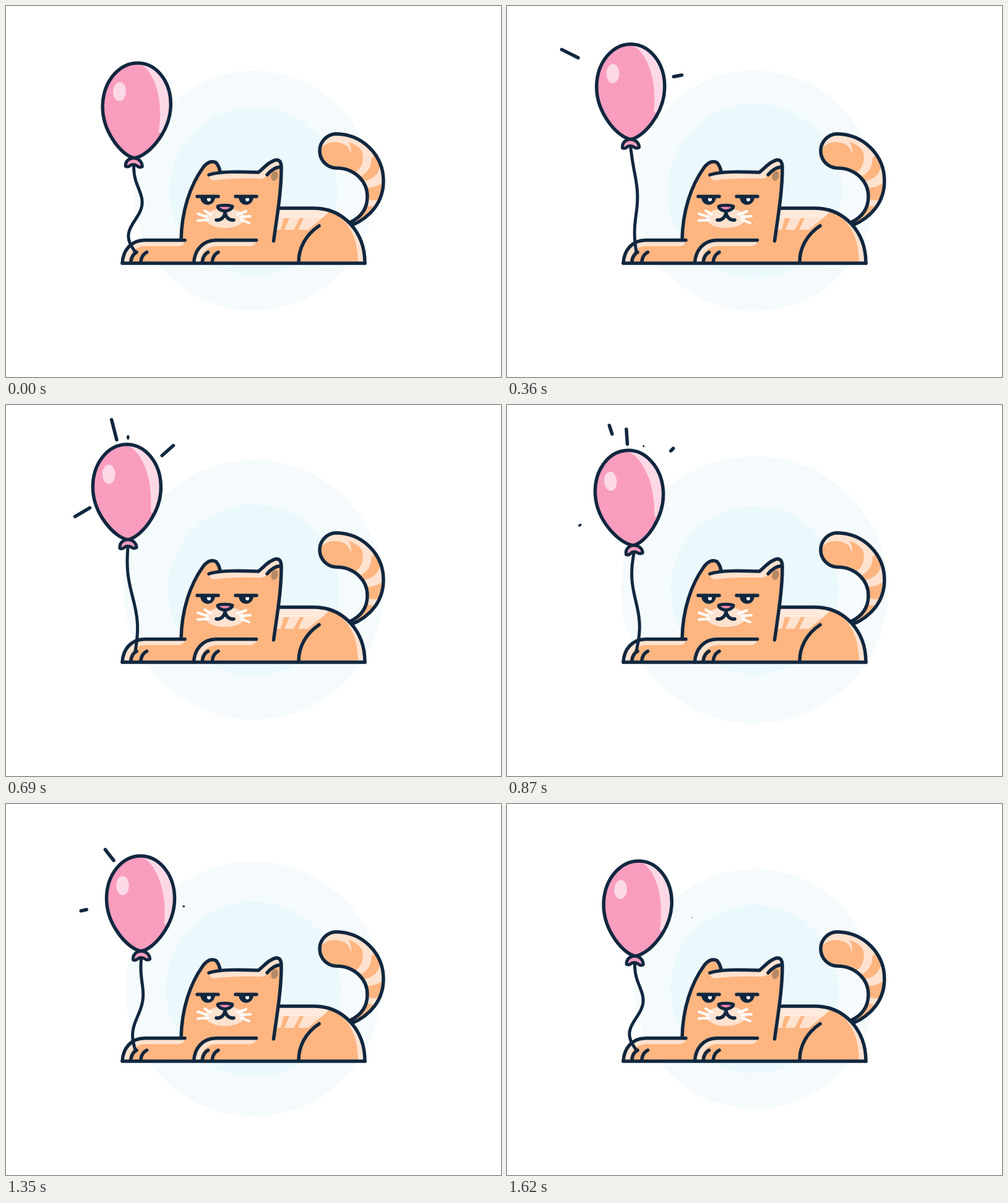
Write an HTML page that moves like this. It is 800 px wide and 600 px high and loops after 1.65 s.

```html
<!DOCTYPE html>
<html lang="en">
<head>
<meta charset="utf-8">
<title>Cat with balloon</title>
<style>
  html, body { margin: 0; width: 100%; height: 100%; overflow: hidden; background: #fff; }
  svg { display: block; width: 100vw; height: 100vh; }
  .ink { fill: none; stroke: #11273f; stroke-width: 5.5; stroke-linecap: round; stroke-linejoin: round; }
  .fur { fill: #ffb580; }
  .pale { fill: #ffe2cf; }
  .pink { fill: #f99dbf; }
  .dark { fill: #11273f; }
</style>
</head>
<body>
<svg viewBox="0 0 800 600">
  <defs>
    <path id="tail" d="M556 350C573 342 584 328 584 308C584 284 564 262 533 262A27.7 27.7 0 0 1 533 206.7C576 207 610 241 610 283C610 317 589 342 558 355Z"/>
    <path id="skin" d="M0 0C-21 -3 -56 -42 -56 -85C-56 -124 -31 -154 -1 -154C29 -154 54 -124 54 -85C54 -42 20 -3 0 0Z"/>
    <clipPath id="inTail"><use href="#tail"/></clipPath>
    <clipPath id="inSkin"><use href="#skin"/></clipPath>
    <g id="eye">
      <path class="dark" d="M-12 0C-12 8 -7 13.5 0 13.5C7 13.5 12 8 12 0Z"/>
      <path fill="#fff" d="M-1 2.5H5V5C5 9 -1 9 -1 5Z"/>
      <path class="ink" d="M-17 0H17"/>
    </g>
    <g id="arm">
      <path class="pale" d="M0 37C1 17 14 0 36 0H102C100 6 97 9.5 92 9.5H35C20 11 11 23 10 37Z"/>
      <path class="ink" d="M0 37C1 17 14 0 36 0H101M14 34C15 26 18 22 23 19.5M30 34C31 26 34 22 39.5 19.5"/>
    </g>
  </defs>

  <circle id="outer" cx="400" cy="298.8" fill="#f5fbfd"/>
  <circle id="inner" cx="400" cy="299.3" fill="#ebf8fc"/>

  <use href="#tail" class="fur"/>
  <g clip-path="url(#inTail)" class="pale">
    <path d="M503 240C513 219 530 217 545 223C553 226 556 232 557 239C559 231 557 225 553 220C563 222 570 228 575 234L592 246L603 225L540 195L500 200Z"/>
    <path d="M574 232C580 246 576 262 565 269L574 275C587 268 592 256 590 243Z"/>
    <path d="M579 283C592 281 602 272 604 261L615 278C610 288 597 294 584 294Z"/>
    <path d="M582 311C592 316 602 315 612 308L606 323C596 326 586 324 578 320Z"/>
  </g>
  <use href="#tail" class="ink"/>

  <path class="fur" d="M430 327H497C545 327 580 365 580 416H430Z"/>
  <path class="pale" d="M436 327H497C545 327 580 365 580 416H569C569 372 552 341 521 333L511 343L488 362H472L481 343H475L465 362H450L458 343H449L444 362H436Z"/>
  <path fill="#ffeadc" d="M436 329H497C506 329 514 331 521 334L511 343H436Z"/>
  <path class="ink" d="M440 327H497C545 327 580 365 580 416M473 414C473 392 484 370 506 355.5"/>

  <path class="fur" d="M188 416C189 395 202 379 224 379H283C284 330 298 290 318 262C325 252 333 250 339 253C343 257 345 262 346 269H408C417 262 424 252 436 249C443 248 445 254 445 262C445 300 438 340 433 380V416Z"/>
  <path class="pale" d="M328 273C350 268 380 268 408 269L422 273C420 278 415 280 405 279C380 278 350 280 336 282C331 282 328 278 328 273Z"/>
  <path class="pale" d="M408 269C417 262 424 252 436 249C442 248 444 254 444 260C434 261 428 266 422 273Z"/>
  <ellipse cx="434" cy="275" rx="5.5" ry="8" transform="rotate(15 434 275)" fill="#b58a67"/>
  <path class="ink" d="M283 378C284 330 298 290 318 262C325 252 333 250 339 253C343 257 345 262 346 268M328 273C345 267 380 268 408 269C417 262 424 252 436 249C443 248 445 254 445 262C445 300 438 340 432.5 380M422 273C428 266 434 261 442 260.5"/>

  <ellipse class="pale" cx="354" cy="343" rx="32" ry="16"/>
  <path d="M321 331L331 337M310 336L325 341M310 347L327 346M388 332L374 337M395 340L379 341M393 351L380 346" stroke="#fff" stroke-width="4" stroke-linecap="round"/>
  <use href="#eye" x="326" y="308"/>
  <use href="#eye" x="388" y="308"/>
  <path class="ink" d="M340 346C347 347 353 342 354 334C355 342 361 347 368 346"/>
  <path class="ink" style="fill:#f986b0;stroke-width:5" d="M342 324C346 321.5 361 321.5 366 324C366 328 359 331.5 354 331.5C348 331.5 342 328 342 324Z"/>

  <use href="#arm" x="188" y="378.7"/>
  <use href="#arm" x="303.5" y="378.7"/>
  <path class="ink" d="M188 416H580"/>

  <path id="string" class="ink" style="stroke-width:5"/>
  <g id="balloon">
    <g id="dashes"></g>
    <use href="#skin" class="pink"/>
    <path clip-path="url(#inSkin)" fill="#fdd8e6" d="M0 -152C18 -147 43 -108 37 -44L65 -40V-160H0Z"/>
    <ellipse cx="-30" cy="-106" rx="10.3" ry="15.5" fill="#fdd8e6"/>
    <use href="#skin" class="ink"/>
    <path class="ink" style="fill:#f99dbf;stroke-width:5" d="M-13 14C-14 6 -8 0 0 0C8 0 14 6 14 13C10 15 8 14 5 12C2 10 -3 10 -5 12C-8 15 -11 15 -13 14Z"/>
  </g>
</svg>
<script>
const LOOP = 1650, CYCLE = 1620, STEP = 30, LIFE = 440;
const HAND = [209, 398];
const { sin, cos, hypot, min, max, PI } = Math;
const $ = id => document.getElementById(id);
const clamp = v => max(0, min(1, v));
const set = (el, attrs) => { for (const k in attrs) el.setAttribute(k, attrs[k]); };

// Balloon drift: time, knot x, knot y, tilt
const drift = [
  [0, 207, 246, 3.5],
  [150, 207, 226, -.3],
  [540, 194, 212, 1.5],
  [870, 204.5, 227, -4],
  [1110, 220, 230, -6.3],
  [1350, 218.5, 238, 0]
];

// Sparks around the balloon: birth, angle, reach
const sparks = [
  [0, -154, 58], [230, -12, 18], [440, 150, 30], [460, -41, 26], [490, -104, 36],
  [675, -90, 26], [862, -70, 16], [950, 167, 33], [1105, -128, 24], [1345, 13, 20]
].map(([birth, deg, reach]) => {
  const line = document.createElementNS('http://www.w3.org/2000/svg', 'line');
  line.setAttribute('class', 'ink');
  $('dashes').append(line);
  return { line, birth, reach, angle: deg * PI / 180, life: min(LIFE, CYCLE - birth) };
});

// Drift key i, continuing past the ends of the cycle
function key(i) {
  const n = drift.length, turn = Math.floor(i / n), [t, ...rest] = drift[i - turn * n];
  return [t + turn * CYCLE, ...rest];
}

// Smooth curve through the keys without overshoot
function driftAt(t) {
  const i = drift.filter(k => k[0] <= t).length - 1;
  const [a, b, c, d] = [i - 1, i, i + 1, i + 2].map(key);
  const span = c[0] - b[0], u = (t - b[0]) / span;
  const mean = (p, q) => p * q > 0 ? 2 * p * q / (p + q) : 0;
  return b.map((v, k) => {
    const slope = (p, q) => (q[k] - p[k]) / (q[0] - p[0]);
    const mid = slope(b, c), m0 = mean(slope(a, b), mid) * span, m1 = mean(mid, slope(c, d)) * span;
    return v + (c[k] - v) * u * u * (3 - 2 * u) + m0 * u * (1 - u) ** 2 - m1 * u * u * (1 - u);
  });
}

// The string swings as a sum of standing waves between knot and hand
function stringPath([x, y], phase) {
  const bow = 3 + 1.5 * (cos(phase) + sin(phase));
  const sway = 1 + 6.5 * cos(phase);
  const curl = -.85 * max(0, sway);
  const pts = Array.from({ length: 29 }, (_, i) => {
    const u = i / 28;
    const wave = bow * sin(PI * u) + sway * sin(2 * PI * u) + curl * sin(3 * PI * u);
    return [x + (HAND[0] - x) * u + wave, y + (HAND[1] - y) * u];
  });
  return 'M' + pts.join('L');
}

// A spark shoots outward, then its tail catches up
function drawSpark({ line, birth, life, angle, reach }, t) {
  const p = (t - birth) / life;
  const head = 1 - (1 - clamp(p / .6)) ** 2, tail = clamp((p - .4) / .6) ** 2;
  const base = 68 + 8 * sin(angle) ** 2, len = reach * (head - tail);
  const at = f => [1.5 + cos(angle) * (base + reach * f), -88 + sin(angle) * (base + reach * f)];
  const [x1, y1] = at(tail), [x2, y2] = at(head);
  set(line, { x1, y1, x2, y2, visibility: len > 0 ? 'visible' : 'hidden' });
  line.style.strokeWidth = min(5.5, len + 1.5);
}

function draw(time) {
  const t = min(CYCLE - .001, Math.floor(time % LOOP / STEP) * STEP);
  const phase = 2 * PI * t / CYCLE;
  const [, x, y, tilt] = driftAt(t), rad = tilt * PI / 180;

  set($('outer'), { r: 204.3 - 13 * cos(phase - .66) });
  set($('inner'), { r: 139 - 3.2 * cos(2 * phase - .44) });
  set($('balloon'), { transform: `translate(${x} ${y}) rotate(${tilt})` });
  set($('string'), { d: stringPath([x - 11 * sin(rad), y + 11 * cos(rad)], phase) });
  sparks.forEach(s => drawSpark(s, t));
}

const began = performance.now();
function tick() {
  draw(performance.now() - began);
  requestAnimationFrame(tick);
}
tick();
</script>
</body>
</html>
```
